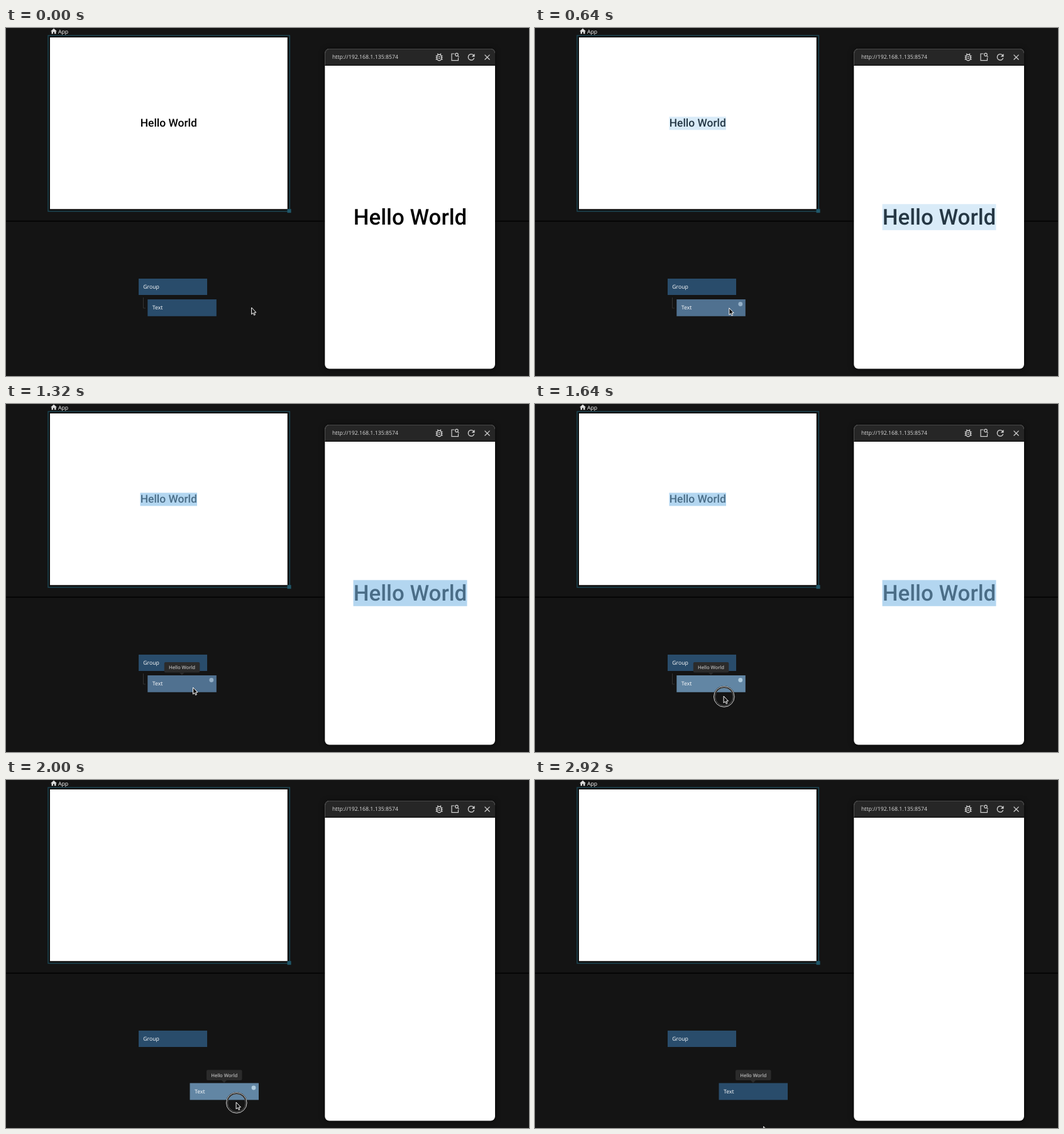
An HTML page for the animation above (2960 ms loop, 832 by 554 pixels).

```html
<!DOCTYPE html>
<html lang="en">
<head>
<meta charset="utf-8">
<title>Hello World</title>
<style>
  html, body { margin: 0; width: 100%; height: 100%; overflow: hidden; background: #141414; }
  svg { display: block; width: 832px; height: 554px; }
  text { font: 500 8.7px "Open Sans", "Noto Sans", sans-serif; fill: #fff; text-rendering: geometricPrecision; }
  .hello { font: 500 17.4px Roboto, sans-serif; fill: #000; text-anchor: middle; }
  .big { font-size: 34.8px; }
  .url { font-size: 8.75px; font-weight: 400; fill: #ddd; }
  .tip { font-size: 7.7px; font-weight: 400; fill: #e4e4e4; text-anchor: middle; }
  .mark { fill: #7fbae6; }
  .window { filter: drop-shadow(0 1px 4px #0009); }
</style>
</head>
<body>
<svg viewBox="0 0 832 554">
  <rect width="832" height="554" fill="#141414"/>
  <path d="M0 307.5H832" stroke="#000" stroke-width="1.5"/>

  <!-- design canvas -->
  <path d="M10 20v-6h4v6h5v-8h3L12 3 2 12h3v8z" fill="#ddd" transform="translate(70 -.7) scale(.5)"/>
  <text x="83" y="8.7">App</text>
  <rect x="67" y="12" width="384.3" height="279.8" fill="#111" stroke="#1d4c5b" stroke-width="1.3"/>
  <rect x="70" y="15" width="377.7" height="273.2" fill="#fff"/>
  <rect x="447.5" y="288.2" width="6" height="6" fill="#20586a"/>

  <!-- preview window -->
  <g class="window">
    <rect x="507.3" y="33" width="270.7" height="509.5" rx="7" fill="#fff"/>
    <path d="M507.3 60V40a7 7 0 0 1 7-7H771a7 7 0 0 1 7 7V60z" fill="#262626"/>
  </g>
  <path d="M508 40a6.5 6.5 0 0 1 6.5-6.5H771a6.5 6.5 0 0 1 6.5 6.5" fill="none" stroke="#484848"/>
  <path d="M507.3 59.3H778" stroke="#050505"/>
  <text class="url" x="519" y="49.2">http://192.168.1.135:8574</text>
  <g fill="#d2d2d2">
    <path transform="translate(681 38.2) scale(.68)" d="M20 8h-2.8a6 6 0 0 0-1.8-2L17 4.4 15.6 3l-2.2 2.2a6 6 0 0 0-2.8 0L8.4 3 7 4.4 8.6 6a6 6 0 0 0-1.8 2H4v2h2.1L6 12H4v2h2l.1 2H4v2h2.8a6 6 0 0 0 10.4 0H20v-2h-2.1l.1-2h2v-2h-2l-.1-2H20zM16 15a4 4 0 0 1-8 0v-4a4 4 0 0 1 8 0zM10 14v2h4v-2zM10 10v2h4v-2z" fill-rule="evenodd"/>
    <path transform="translate(732 38.2) scale(.68)" d="M17.65 6.35A7.96 7.96 0 0 0 12 4a8 8 0 1 0 7.73 10h-2.08A6 6 0 1 1 12 6c1.66 0 3.14.69 4.22 1.78L13 11h7V4z"/>
    <path transform="translate(758 39) scale(.63)" d="M19 6.4 17.6 5 12 10.6 6.4 5 5 6.4 10.6 12 5 17.6 6.4 19 12 13.4 17.6 19 19 17.6 13.4 12z"/>
  </g>
  <g fill="none" stroke="#d2d2d2" stroke-width="1.2">
    <path d="M713.5 41H709v10.700h10.500V47.200M718.500 44.200l2.200 2.200"/>
    <circle cx="717" cy="42.400" r="2.200"/>
  </g>

  <g id="content">
    <text class="hello" x="258.8" y="157.4">Hello World</text>
    <text class="hello big" x="643" y="312.8">Hello World</text>
    <g id="marks">
      <rect class="mark" x="213.5" y="141.3" width="90.5" height="21"/>
      <rect class="mark" x="552.5" y="280.3" width="181" height="41.5"/>
    </g>
    <path d="M218.5 429V446H222" fill="none" stroke="#333"/>
  </g>

  <!-- node tree -->
  <rect x="211" y="399" width="109" height="26" fill="#294c6b"/>
  <text x="218.3" y="414.8">Group</text>
  <g id="node">
    <rect id="box" width="109.5" height="26.8"/>
    <text x="7.5" y="16.3">Text</text>
    <circle id="dot" cx="101.5" cy="7.5" r="3.4"/>
    <g id="tip">
      <path d="M50.5-4.5h8L54.5-.5z" fill="#2b2b2b"/>
      <rect x="26.5" y="-21" width="56.5" height="16.5" rx="2" fill="#2b2b2b"/>
      <text class="tip" x="54.7" y="-9.9">Hello World</text>
    </g>
  </g>

  <g id="cursor">
    <g id="ring" fill="none">
      <circle r="15.5" cx=".3" cy="1" stroke="#111" stroke-width="3"/>
      <circle r="16.3" cx=".3" cy="1" stroke="#d8d8d8"/>
      <circle r="14.3" cx=".3" cy="1" stroke="#777" stroke-width=".7"/>
    </g>
    <path d="M-.4 0V10.800L2.100 8.600 3.700 12.200 5.400 11.500 3.900 7.900H7z" fill="#111" stroke="#fff"/>
  </g>
</svg>
<script>
const LOOP = 2960, STEP = 40;
const REST = [225.3, 432], GRAB = [74, 30.5];

// pointer path: time, x, y
const PATH = [
  [0, 391, 445], [40, 391, 445], [240, 372, 444], [480, 339.5, 443.5], [560, 326, 444.5],
  [720, 292.5, 447], [920, 292.5, 447], [1400, 299, 452], [1480, 299, 453],
  [1600, 299.5, 462.5], [1640, 300.5, 465], [1720, 320, 488], [1760, 326, 492.5],
  [1880, 352, 508], [1960, 366.5, 513], [2680, 366.5, 513], [2920, 364, 551.5], [LOOP, 364, 551.5]
];

const $ = id => document.getElementById(id);
const ramp = (t, from, to) => Math.min(1, Math.max(0, (t - from) / (to - from)));
const place = (id, [x, y]) => $(id).setAttribute("transform", `translate(${x} ${y})`);

function pointer(t) {
  const i = Math.max(1, PATH.findIndex(p => p[0] >= t));
  const [t0, x0, y0] = PATH[i - 1], [t1, x1, y1] = PATH[i];
  const k = ramp(t, t0, t1);
  return [x0 + (x1 - x0) * k, y0 + (y1 - y0) * k];
}

// the dragged node trails the pointer by one step
function nodePlace(t) {
  if (t <= 1640) return REST;
  const p = pointer(Math.min(t, 2000) - STEP);
  return p.map((v, i) => Math.max(REST[i], v - GRAB[i]));
}

const mix = (a, b, k) => a.map((v, i) => v + (b[i] - v) * k);
const rgb = c => `rgb(${c.map(Math.round)})`;

function draw(t) {
  const hover = ramp(t, 500, 640) * (1 - ramp(t, 2660, 2800));
  const press = ramp(t, 1440, 1560) * (1 - ramp(t, 2240, 2320));
  const lit = mix([80, 113, 144], [98, 134, 164], press);
  $("box").setAttribute("fill", rgb(mix([41, 76, 107], lit, hover)));
  $("dot").setAttribute("fill", rgb(mix([149, 176, 199], [176, 204, 222], press)));
  $("dot").setAttribute("opacity", hover);
  $("tip").setAttribute("opacity", ramp(t, 840, 920));
  $("marks").setAttribute("opacity", 0.59 * ramp(t, 560, 720));
  $("content").setAttribute("visibility", t < 1680 ? "visible" : "hidden");
  $("ring").setAttribute("opacity", press);
  place("node", nodePlace(t));
  place("cursor", pointer(t));
}

const start = performance.now();
function tick() {
  const t = (performance.now() - start) % LOOP;
  draw(Math.floor(t / STEP) * STEP);
  requestAnimationFrame(tick);
}
tick();
</script>
</body>
</html>
```
